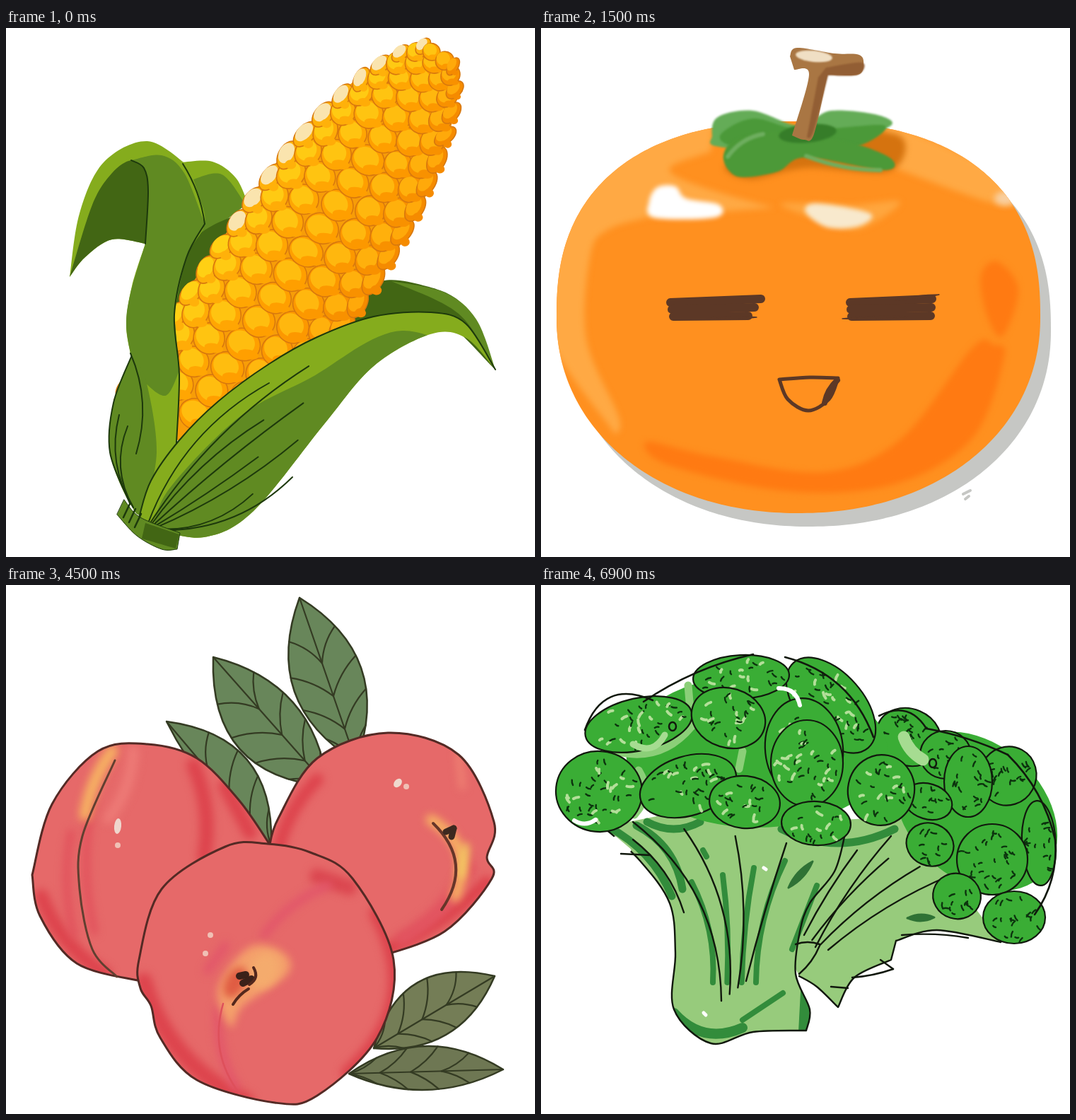
Animation of 748x748 px, one loop 7500 ms. Source, as an HTML page with a canvas:

```html
<!DOCTYPE html>
<html lang="en">
<head>
<meta charset="utf-8">
<title>Fruit and vegetables</title>
<style>
html, body { margin: 0; width: 100%; height: 100%; overflow: hidden; background: #fff; }
canvas { display: block; width: 100vw; height: 100vh; }
</style>
</head>
<body>
<canvas id="stage" width="748" height="748"></canvas>
<script>
const ctx = document.getElementById('stage').getContext('2d');
const HOLD = 1500;

const mix = (a, b, t) => a + (b - a) * t;
const pairs = s => s.trim().split(/\s+/).map(p => p.split(',').map(Number));

function seeded(seed) {
  return () => (seed = (seed * 16807) % 2147483647) / 2147483647;
}

// Smooth curve through points; "|" marks a sharp corner.
function curve(s, loop) {
  const path = new Path2D(), parts = s.split('|').map(pairs);
  const ring = loop && parts.length === 1;
  let last = null;
  for (const q of parts) {
    if (last) q.unshift(last); else path.moveTo(...q[0]);
    const n = q.length;
    const at = k => ring ? q[(k + n) % n] : q[Math.max(0, Math.min(n - 1, k))];
    for (let k = 0; k < (ring ? n : n - 1); k++) {
      const a = at(k - 1), b = at(k), c = at(k + 1), d = at(k + 2);
      path.bezierCurveTo(b[0] + (c[0] - a[0]) / 6, b[1] + (c[1] - a[1]) / 6,
        c[0] - (d[0] - b[0]) / 6, c[1] - (d[1] - b[1]) / 6, ...c);
    }
    last = q[n - 1];
  }
  if (loop) path.closePath();
  return path;
}

function fill(color, path) {
  ctx.fillStyle = color;
  ctx.fill(path);
  return path;
}

function stroke(color, w, path) {
  ctx.strokeStyle = color;
  ctx.lineWidth = w;
  ctx.stroke(path);
}

function shape(color, s, edge, w) {
  const path = fill(color, curve(s, true));
  if (edge) stroke(edge, w, path);
  return path;
}

function oval(color, x, y, rx, ry = rx, turn = 0, edge, w) {
  const path = new Path2D();
  path.ellipse(x, y, rx, ry, turn, 0, 7);
  fill(color, path);
  if (edge) stroke(edge, w, path);
  return path;
}

// Control point of a stroke that bows sideways by b.
function bow(x0, y0, x1, y1, b = 0) {
  const dx = x1 - x0, dy = y1 - y0, k = 2 * b / Math.hypot(dx, dy);
  return [(x0 + x1) / 2 - dy * k, (y0 + y1) / 2 + dx * k];
}

function arcs(color, w, ...rows) {
  for (const [x0, y0, x1, y1, b] of rows) {
    const p = new Path2D();
    p.moveTo(x0, y0);
    p.quadraticCurveTo(...bow(x0, y0, x1, y1, b), x1, y1);
    stroke(color, w, p);
  }
}

// A bowed stroke, thickest in the middle.
function taper(color, w, ...rows) {
  for (const [x0, y0, x1, y1, b] of rows) {
    const p = new Path2D();
    p.moveTo(x0, y0);
    p.quadraticCurveTo(...bow(x0, y0, x1, y1, b + w / 2), x1, y1);
    p.quadraticCurveTo(...bow(x0, y0, x1, y1, b - w / 2), x0, y0);
    fill(color, p);
    stroke(color, Math.min(3, w / 3), p);
  }
}

function soft(blur, draw) {
  ctx.save();
  ctx.filter = `blur(${blur}px)`;
  draw();
  ctx.restore();
}

function inside(path, draw) {
  ctx.save();
  ctx.clip(path);
  draw();
  ctx.restore();
}

// Same path, shrunk around a centre and shifted.
function shrunk(path, x, y, k, dx, dy) {
  const p = new Path2D();
  p.addPath(path, new DOMMatrix([k, 0, 0, k, x - x * k + dx, y - y * k + dy]));
  return p;
}

function cob() {
  const rnd = seeded(5);
  const width = t => 108 * Math.sqrt(1 - (Math.max(0, t - 0.55) / 0.47) ** 2);
  const spot = (t, v) => {
    const w = width(t) * v;
    return [mix(205, 609, t) + w * 0.83, mix(640, 43, t) + w * 0.56];
  };
  const p = new Path2D();
  for (let t = 0.09; t < 1; t += 0.01) p.lineTo(...spot(t, -1));
  for (let t = 1; t > 0.09; t -= 0.01) p.lineTo(...spot(t, 1));
  fill('#f79d08', p);

  let row = 0;
  for (let t = 0.13; t < 1.01; row++) {
    const size = 0.42 + 0.58 * width(t) / 108;
    for (let j = row % 2; j < 7; j += 2) {
      const angle = (j - 3) * 0.44, side = j / 6;
      const [x, y] = spot(t, Math.sin(angle) * 0.97);
      const rx = (8 + 15 * Math.cos(angle)) * size + rnd() * 2, ry = 21 * size + rnd() * 2;
      const tilt = 0.4 + rnd() * 0.5;
      const base = `hsl(${41 - 7 * side},100%,${52 - 4 * side}%)`;
      const pale = j === 0 && t > 0.5;
      const glow = pale ? '#fae4ae' : `hsl(${48 - 9 * side},100%,${mix(54, 52, side)}%)`;
      oval(base, x, y, rx, ry, tilt, '#d7780e', 1.6);
      oval(glow, x - 2, y - 3, rx * 0.78, ry * 0.72, tilt);
      oval(base, x + rx * 0.3, y + ry * 0.62, rx * 0.6, ry * 0.3, 0.2);
    }
    t += 0.0275 * size;
  }
}

function corn() {
  const dark = '#426614', mid = '#608a22', light = '#85ac1d', ink = '#1d390c';
  shape(dark, '470,430 520,362 590,364 650,395 692,483 | 600,405 480,425');
  shape(mid, '545,358 620,374 665,412 692,483 | 640,404 545,358');
  shape(light, '248,190 292,189 325,212 342,248 | 280,290');
  shape(mid, '262,215 305,207 339,250 | 275,300');
  shape(dark, '236,415 262,305 327,263 | 345,285 260,410');
  cob();

  const fold = '281,277 255,325 238,405 245,490 241,587';
  const curl = '197,305 | 150,299 112,324 90,352';
  const hook = '177,187 195,198 201,230 197,305';
  const flank = '177,465 152,530 147,600 175,672';
  shape(light, `90,352 104,262 138,190 200,160 258,195 | 272,235 ${fold} | 205,700 | 175,672 147,600 152,530 177,465 | 170,420 178,365 ${curl}`);
  shape(dark, `90,352 122,250 150,205 ${hook} | ${curl}`);
  shape(mid, `${hook} | 176,375 170,420 177,465 | 190,494 225,520 245,485 | 238,405 | 255,325 281,277 | 252,205 220,180 177,187`);
  shape(mid, `${flank} | 192,685 213,600 197,495 177,465`);
  stroke(ink, 2, curve(`${hook}`));
  stroke(ink, 2, curve(fold));
  stroke(ink, 2, curve(flank));
  arcs(ink, 2, [250, 192, 281, 277, -5], [176, 460, 184, 602, -13]);
  for (let i = 0; i < 2; i++) arcs(ink, 2, [160 + 12 * i, 547 + 16 * i, 180, 678, 14]);

  const rim = '188,692 205,640 245,583 300,528 372,475 440,437 520,408 600,402 650,418 692,483';
  const front = shape(light, `${rim} | 650,438 600,433 520,478 450,560 350,683 280,720 210,708`);
  inside(front, () => shape(mid, '208,706 232,650 330,550 430,495 560,428 692,483 | 690,500 500,600 300,740'));
  stroke(ink, 2, curve(rim));
  for (let i = 0; i < 8; i++) {
    const t = i / 7, out = i % 2;
    arcs(ink, 2, [mix(201, 214, t), mix(700, 710, t),
      mix(372, 345, t) + 60 * out, mix(502, 685, t) - 50 * out, mix(-24, 22, t)]);
  }
  shape(mid, '167,667 | 190,692 246,714 | 242,737 | 220,737 185,718 157,688', ink, 1);
  shape(dark, '197,700 | 245,716 | 240,736 | 192,722');
  for (let i = 0; i < 3; i++) arcs(ink, 2.5, [175 + 8 * i, 673 + 7 * i, 166 + 8 * i, 692 + 7 * i]);
}

// Rounded body with its own fullness above and below the middle.
function plump(x, y, rx, ry, top, bottom) {
  const p = new Path2D();
  for (let a = 0; a < 6.28; a += 0.02) {
    const c = Math.cos(a), s = Math.sin(a), e = 2 / (s < 0 ? top : bottom);
    p.lineTo(x + rx * Math.sign(c) * Math.abs(c) ** e, y + ry * Math.sign(s) * Math.abs(s) ** e);
  }
  p.closePath();
  return p;
}

function persimmon() {
  const ink = '#5c3826';
  const body = plump(364, 409, 342, 277, 2.45, 2.1);
  fill('#c6c7c4', shrunk(body, 364, 409, 1, 15, 19));
  arcs('#c6c7c4', 4, [597, 659, 607, 654], [600, 666, 605, 662]);
  fill('#ff901f', body);
  inside(body, () => soft(4, () => {
    shape('#ffa944', '245,125 60,200 0,400 105,575 | 110,550 64,440 70,320 95,285 150,268 | 330,254 | 260,235 195,212 185,195 240,175');
    shape('#ffa944', '480,128 630,195 680,250 | 630,245 500,198');
    shape('#ff7a12', '150,585 240,605 400,628 510,580 610,452 640,448 655,465 610,580 500,645 350,655 180,618');
    shape('#ff7a12', '622,350 645,330 675,370 652,436 630,405');
    shape('#ffa63e', '340,248 440,250 508,246 450,284 390,270');
    shape('#d5730f', '265,190 295,214 375,198 492,203 508,153 400,150');
    oval('#f9cfa0', 656, 241, 15, 10);
  }));
  soft(3, () => {
    shape('#fff', '153,245 165,225 190,224 205,241 252,250 246,268 160,268');
    shape('#f8e9cd', '374,260 390,248 465,262 450,280 405,282');
  });
  soft(1.5, () => {
    shape('#64ac57', '242,152 250,126 300,117 365,138 410,117 480,124 488,142 370,172 252,168');
    shape('#4b9939', '253,153 300,128 370,144 486,138 430,172 290,170');
    shape('#4c9938', '258,180 275,158 330,147 430,160 494,184 485,201 375,183 335,203 286,211 266,202');
    arcs('#6eae5f', 6, [264, 182, 314, 150, -6], [375, 181, 480, 201, 5]);
    oval('#367d29', 377, 149, 41, 13, -0.1);
  });
  shape('#a97643', '352,40 362,28 415,36 450,38 456,52 448,66 405,66 | 386,150 372,158 355,152 | 379,66 358,59');
  soft(1, () => {
    shape('#925e34', '403,56 454,49 448,66 406,67 | 385,146 376,155 | 392,70');
    oval('#f0dfc4', 386, 40, 26, 8, 0.1);
  });
  for (let i = 0; i < 3; i++) {
    const y = 388 + 10 * i;
    arcs(ink, 12, [183 + 2 * i, y, 311 - 9 * i, y - 5 + 2 * i], [437 + i, y, 553 - i, y - 5 + 2 * i]);
  }
  taper(ink, 4, [500, 385, 563, 377, 0], [426, 411, 520, 408, 0], [240, 410, 305, 409, 0]);
  shape('#ff901f', '337,497 380,494 420,495 | 407,525 378,541 349,525 337,497', ink, 5);
  arcs(ink, 8, [419, 498, 401, 530, 3]);
}

function potatoes() {
  const rim = '#6c2021', skin = '#8d3434', shade = '#822625';
  arcs('#71302c', 5, [325, 94, 314, 124], [67, 250, 66, 277, -5], [666, 318, 654, 346, -3],
    [582, 221, 556, 236], [618, 624, 630, 626]);
  arcs('#82433c', 4, [448, 72, 436, 92], [259, 123, 261, 140], [174, 166, 177, 184],
    [714, 533, 697, 535], [715, 371, 702, 376], [494, 661, 491, 674], [565, 642, 570, 649]);

  const big = shape(rim, '558,69 | 567,80 564,180 530,335 | 400,500 300,542 | 180,549 70,522 25,420 60,290 175,188 345,112 558,69');
  const flesh = fill(skin, shrunk(big, 296, 309, 0.935, 6, -9));
  inside(flesh, () => shape(shade, '560,155 490,270 440,330 320,385 240,450 150,492 50,497 | 70,560 300,560 560,350'));
  taper(rim, 9, [158, 235, 213, 315, -8], [266, 153, 306, 197, -5], [391, 210, 423, 240, -2],
    [427, 248, 482, 340, -2], [334, 318, 370, 378, -4], [62, 342, 146, 410, -6]);
  taper(rim, 16, [169, 367, 288, 522, -4]);
  arcs(rim, 9, [194, 248, 208, 239, -2], [262, 394, 266, 422, 6]);
  taper('#9d4546', 7, [140, 229, 91, 286, 0]);
  taper('#e8dcda', 12, [151, 231, 89, 330, 2]);
  taper('#e8dcda', 6, [284, 162, 343, 139, -5], [257, 185, 273, 172, -1], [74, 367, 71, 390, 0]);

  const small = shape(rim, '390,671 | 330,620 299,490 335,395 450,342 550,332 665,352 729,440 690,550 600,630 480,670 390,671');
  const meat = fill(skin, shrunk(small, 514, 502, 0.93, -4, 0));
  inside(meat, () => shape(shade, '740,410 660,465 520,545 400,586 | 400,670 | 600,650 740,520'));
  const cut = shape('#c95b08', '332,416 370,460 402,540 383,667 | 330,605 314,480 332,416');
  stroke(rim, 16, shrunk(cut, 358, 540, 1.06, 2, 0));
  fill('#c95b08', cut);
  inside(cut, () => oval('#da7f1b', 378, 652, 14, 20));
  shape('#ef8900', '332,416 | 389,500 395,540 376,603 | 338,565 322,460 332,416');
  taper('#fff8e8', 11, [338, 501, 347, 568, 4]);
  arcs('#fff8e8', 9, [354, 580, 362, 588]);
  taper(rim, 14, [480, 512, 500, 645, -15]);
  taper(rim, 10, [472, 361, 533, 514, -13], [361, 396, 382, 423, -6], [612, 539, 610, 600, -6],
    [658, 473, 659, 550, -7], [618, 360, 658, 424, -4], [660, 432, 674, 451, -1]);
  arcs(rim, 10, [535, 402, 545, 423, 5], [559, 577, 547, 599, 7]);
  arcs('#f0e6e4', 10, [449, 378, 461, 374]);
  taper('#f5f0ef', 16, [484, 366, 570, 360, -4]);
}

// Leaf from tip to base, bulging by a on one side and b on the other.
function leaf(color, x0, y0, x1, y1, a, b) {
  const ink = '#343b23', p = new Path2D(), vein = [];
  const ends = [x0, y0, x1, y1];
  p.moveTo(x0, y0);
  p.quadraticCurveTo(...bow(...ends, -a), x1, y1);
  p.quadraticCurveTo(...bow(...ends, b), x0, y0);
  fill(color, p);
  for (const side of [-a, b]) {
    const [cx, cy] = bow(...ends, side);
    for (let t = 0.3; t < 0.9; t += 0.2) {
      const e = t - 0.08, f = 2 * e * (1 - e);
      const x = (1 - e) ** 2 * x0 + f * cx + e * e * x1, y = (1 - e) ** 2 * y0 + f * cy + e * e * y1;
      vein.push([mix(x0, x1, t + 0.1), mix(y0, y1, t + 0.1), x, y, side / 12]);
    }
  }
  arcs(ink, 2.2, [...ends, 0], ...vein);
  stroke(ink, 2.5, p);
}

function peaches() {
  const ink = '#542a25', skin = '#e66969', red = '#dd444d', green = '#68865a', glow = '#f6b163';
  leaf(green, 415, 18, 495, 250, 50, 50);
  leaf(green, 293, 102, 455, 285, 42, 58);
  leaf(green, 227, 193, 375, 368, 52, 14);
  leaf('#747d56', 691, 553, 520, 655, 36, 48);
  leaf('#6e7753', 703, 685, 485, 691, 26, 36);

  const peach = (s, shading) => {
    const body = shape(skin, s);
    inside(body, () => soft(6, shading));
    stroke(ink, 3, body);
  };

  peach('37,410 65,310 130,235 200,225 270,245 330,305 375,370 | 300,470 190,560 | 100,535 48,468 37,410', () => {
    arcs(red, 20, [265, 255, 280, 385, -10], [310, 285, 345, 350], [50, 440, 140, 550, 12]);
    arcs('#e1505b', 10, [92, 350, 96, 495, 8], [122, 310, 125, 490, 10]);
    arcs('#ed7a76', 16, [180, 235, 145, 330, -8]);
    arcs(glow, 17, [150, 235, 112, 325, 6]);
  });
  stroke('#613f30', 3, curve('154,248 108,355 104,430 122,515 157,554'));

  peach('372,372 385,330 440,245 540,209 640,240 690,335 680,385 687,415 620,490 520,528 | 372,372', () => {
    arcs(red, 18, [385, 375, 440, 275, -8], [540, 515, 680, 420, 8]);
    arcs('#e25460', 20, [560, 500, 655, 400, 10]);
    arcs('#ef8273', 9, [640, 238, 645, 285]);
    arcs(glow, 15, [601, 332, 635, 440, -25]);
    arcs('#f2cd61', 10, [650, 370, 643, 410]);
  });
  arcs('#663529', 4, [604, 337, 616, 459, -26]);
  arcs('#3d2920', 9, [622, 349, 633, 344], [633, 344, 630, 356]);

  peach('188,530 220,430 310,370 370,366 430,378 490,415 548,530 525,640 440,722 380,732 270,700 218,640 205,595 190,570', () => {
    arcs(red, 23, [525, 465, 485, 690, -45], [195, 560, 340, 730, 25]);
    arcs('#db4750', 22, [440, 412, 485, 428]);
    arcs('#e2566a', 12, [365, 495, 455, 425, -8], [310, 510, 285, 545], [300, 600, 325, 710, 8]);
    shape('#f4a06b', '300,570 345,512 392,520 398,550 335,595 318,625');
    oval('#f4ab6d', 365, 545, 20, 26, 0.5);
    oval('#e05c43', 324, 562, 14, 24, 0.5);
  });
  arcs('#de505b', 2.5, [307, 592, 330, 719, 16]);
  arcs('#3c2119', 10, [330, 553, 339, 551], [335, 563, 347, 557]);
  arcs('#54281d', 4, [350, 541, 344, 565, -6], [343, 571, 321, 593, 2]);
  oval('#efd6cd', 158, 341, 5, 11, 0.1);
  oval('#efd9ce', 554, 280, 5, 7, 0.7);
  for (const [x, y] of pairs('158,368 566,285 289,495 282,521')) oval('#f0c0b5', x, y, 4);
}

const FLORET = '#3aad35', OUTLINE = '#11180d';

// Florets as ovals: x, y, radii and turn, with scattered marks.
function florets(pale, rnd, rows) {
  for (const [x, y, rx, ry, turn] of pairs(rows)) {
    oval(FLORET, x, y, rx, ry, turn, OUTLINE, 2.2);
    for (let i = 0; i < rx * ry / 85; i++) {
      const r = 0.84 * Math.sqrt(rnd()), a = rnd() * 6.28, lean = rnd() * 3.14;
      const u = rx * r * Math.cos(a), v = ry * r * Math.sin(a);
      const px = x + u * Math.cos(turn) - v * Math.sin(turn);
      const py = y + u * Math.sin(turn) + v * Math.cos(turn);
      const light = rnd() < pale, len = light ? 4 + 5 * rnd() : 4 + 4 * rnd();
      arcs(light ? '#b3df99' : '#0c330e', light ? 4 : 2.4,
        [px, py, px + Math.cos(lean) * len, py + Math.sin(lean) * len, 0.6]);
    }
  }
}

function broccoli() {
  const stalk = '#97cb7c', deep = '#328c3b', rnd = seeded(77);
  const flap = '365,553 | 390,568 420,597 | 443,555 495,530 | 502,503 | 560,488 650,505';
  shape(stalk, `${flap} | 520,330 | 380,350 340,500`);
  const left = '88,342 140,390 182,450 190,520 188,600';
  const right = '240,648 300,632 375,630 | 380,600 360,550 366,490 380,450 415,405 430,352';
  const trunk = shape(stalk, `${left} ${right} | 300,300`);
  inside(trunk, () => arcs(deep, 14, [188, 605, 285, 626, 18], [374, 575, 371, 632]));
  arcs(deep, 11, [95, 342, 185, 440, -12], [135, 340, 200, 430, -14], [340, 345, 500, 345, 20], [150, 335, 225, 335, 10]);
  for (let i = 0; i < 4; i++) {
    const t = i / 3;
    arcs(deep, 8, [mix(213, 345, t), 420 - 30 * t, mix(243, 304, t), 562, mix(-10, 10, t)]);
    arcs(OUTLINE, 2.4, [mix(130, 347, t), mix(335, 365, t), mix(255, 290, t), mix(588, 560, t), mix(-34, 2, t)]);
    arcs(OUTLINE, 2.4, [mix(372, 406, t), mix(495, 516, t), mix(447, 580, t), mix(375, 410, t), mix(-3, -8, t)]);
  }
  arcs(deep, 8, [285, 615, 342, 577], [229, 375, 234, 384], [355, 515, 390, 425]);
  arcs(OUTLINE, 2.4, [113, 380, 154, 382], [130, 360, 202, 463, -10], [360, 508, 394, 508, -3], [394, 510, 365, 550, -3],
    [388, 512, 495, 355, -6], [440, 555, 498, 543, 2], [498, 543, 480, 530], [510, 495, 604, 499, -3], [410, 568, 434, 570]);
  stroke(OUTLINE, 2.4, curve(`${left} ${right}`));
  stroke(OUTLINE, 2.4, curve(flap));
  taper('#2f7235', 9, [350, 428, 384, 391, 0], [518, 471, 556, 470, 0]);
  arcs('#fff', 5, [105, 358, 125, 375], [315, 400, 318, 402], [230, 605, 233, 608]);

  oval(FLORET, 615, 320, 130, 95, 0.75);
  florets(0, rnd, `520,215,47,40,0.4 572,240,36,34,0 660,270,40,42,0.5 704,365,24,60,-0.05
    604,278,34,50,0 638,388,50,50,0 669,470,44,37,0 588,440,34,32,0.3 550,367,34,30,0.4 547,306,35,25,0.3`);
  oval(FLORET, 305, 235, 185, 108);
  arcs('#8bcf78', 11, [105, 235, 213, 200, 18], [213, 200, 208, 142], [138, 262, 132, 325, -12], [285, 235, 280, 260]);
  florets(0.4, rnd, `410,170,80,46,0.85 82,292,61,57,0.1 138,197,77,37,-0.22 208,284,70,42,-0.3
    283,130,68,31,-0.05 265,188,53,42,0.3 372,232,55,72,-0.1 376,252,51,61,0 288,307,50,37,0.1
    389,337,49,31,0.05 481,290,47,50,0.2`);
  arcs('#a6dc91', 9, [130, 225, 175, 212, 12]);
  arcs('#a6dc91', 17, [513, 215, 540, 247, 4]);
  arcs('#fff', 6, [47, 333, 77, 332, 5], [336, 146, 366, 170, -8]);
  arcs(OUTLINE, 2.6, [62, 205, 158, 163, -28], [145, 165, 300, 98, -8], [345, 102, 470, 215, -22],
    [478, 185, 545, 203, -16], [545, 203, 660, 240, -4], [660, 240, 727, 360, -10], [727, 360, 698, 466, -10]);
  for (const [x, y] of pairs('186,200 554,252')) oval(FLORET, x, y, 5, 6, 0, OUTLINE, 2.5);
}

const scenes = [corn, persimmon, potatoes, peaches, broccoli];
let shown = -1;

function tick() {
  const i = Math.floor(performance.now() / HOLD) % scenes.length;
  if (i !== shown) {
    shown = i;
    ctx.fillStyle = '#fff';
    ctx.fillRect(0, 0, 748, 748);
    scenes[i]();
  }
  requestAnimationFrame(tick);
}

ctx.lineCap = ctx.lineJoin = 'round';
tick();
</script>
</body>
</html>
```
